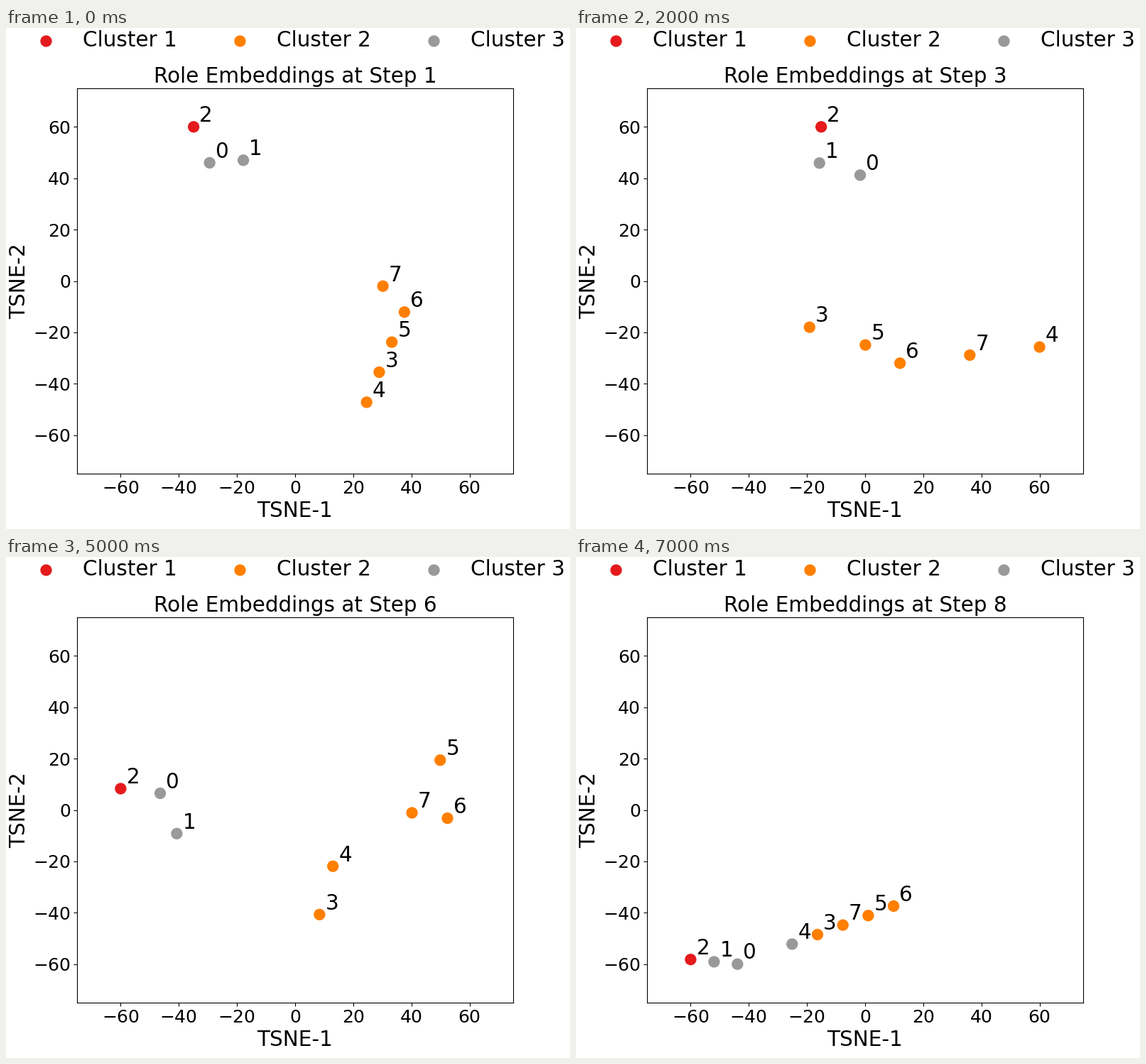
Animation, 794 px wide and 706 px high, one loop 8000 ms. Source, as a matplotlib script:

```python
import numpy as np
import matplotlib.pyplot as plt
from matplotlib.animation import FuncAnimation

W, H, DPI = 794, 706, 100
BIG, SMALL, DOT = 21.25, 18, 115
RED, ORANGE, GRAY = "#e41a1c", "#ff7f00", "#999999"
plt.rcParams["font.family"] = "DejaVu Sans"

fig = plt.figure(figsize=(W / DPI, H / DPI), dpi=DPI, facecolor="white")


def chain(order, **keys):
    """Place agents 0 to 7 as x + yj: those without a key point are
    spaced evenly between their keyed neighbours in the given order."""
    spots = sorted((order.index(name[1:]), p) for name, p in keys.items())
    at, points = zip(*spots)
    places = np.interp(range(len(order)), at, np.array(points, complex))
    return places[[order.index(str(i)) for i in range(8)]]


def build_steps():
    first = chain("20176534", a2=-34.9+60j, a0=-29.4+46j, a1=-17.8+47j,
                  a7=30.2-2j, a6=37.6-12.1j, a4=24.6-47.2j)
    spread = chain("21035674", a2=-15.1+60j, a1=-15.7+45.9j, a0=-1.7+41.2j,
                   a3=-19.1-18j, a5=0.1-24.9j, a6=12-32j, a4=60-25.7j)
    left = chain("20135674", a2=60-35j, a0=46.6-26.2j, a1=41-37.6j,
                 a3=-12.1-7.5j, a5=-31-0.5j, a6=-38-11.5j,
                 a7=-26.3-21.5j, a4=-26.1-46.6j)
    right = chain("20134765", a2=-60-8.3j, a0=-46.4-6.5j, a1=-40.7+9.2j,
                  a3=8.4+40.7j, a4=13+21.9j, a7=40.2+1.1j,
                  a6=52.4+3.2j, a5=49.9-19.4j)
    diagonal = chain("21043756", a2=-27.8-31.3j, a1=-16.1-27.7j,
                     a0=-15-13j, a4=25+24.8j, a6=60+60j)
    low = chain("21043756", a2=-60-58.2j, a0=-43.9-60j,
                a4=-25.1-52.2j, a6=9.8-37.4j)
    # The embedding has no fixed orientation: two steps are turned copies.
    return [first, -left, spread, left, right, right.conj(), diagonal, low]


def draw_legend():
    """Three entries in a row, laid out in stage pixels."""
    ax = fig.add_axes([0, 0, 1, 1])
    ax.set(xlim=(0, W), ylim=(H, 0))
    ax.axis("off")
    for i, color in enumerate((RED, ORANGE, GRAY)):
        x = 55.7 + 273 * i
        ax.scatter(x, 17.9, s=DOT, color=color)
        ax.text(x + 51.9, 25.5, f"Cluster {i + 1}", fontsize=BIG)


def draw_axes():
    left, top, right, bottom = 100, 85, 714, 628
    ax = fig.add_axes([left / W, 1 - bottom / H,
                       (right - left) / W, (bottom - top) / H])
    ticks = range(-60, 61, 20)
    ax.set(xlim=(-75, 75), ylim=(-75, 75), xticks=ticks, yticks=ticks)
    ax.tick_params(labelsize=SMALL, pad=3)
    ax.set_xlabel("TSNE-1", fontsize=BIG, labelpad=3.5)
    ax.set_ylabel("TSNE-2", fontsize=BIG, labelpad=3.5)
    return ax


steps = build_steps()
draw_legend()
ax = draw_axes()
title = ax.set_title("", fontsize=BIG)
dots = ax.scatter(steps[0].real, steps[0].imag, s=DOT)
labels = [ax.annotate(str(i), (0, 0), xytext=(5.8, 5.2),
                      textcoords="offset points", fontsize=BIG)
          for i in range(8)]


def update(n):
    title.set_text(f"Role Embeddings at Step {n + 1}")
    colors = [GRAY, GRAY, RED] + [ORANGE] * 5
    if n == len(steps) - 1:
        colors[4] = GRAY  # agent 4 changes cluster at the end
    dots.set_offsets(np.column_stack([steps[n].real, steps[n].imag]))
    dots.set_color(colors)
    for label, p in zip(labels, steps[n]):
        label.xy = p.real, p.imag
    return [title, dots, *labels]


anim = FuncAnimation(fig, update, frames=len(steps), interval=1000,
                     repeat=True, repeat_delay=0, blit=False)
plt.show()
```
